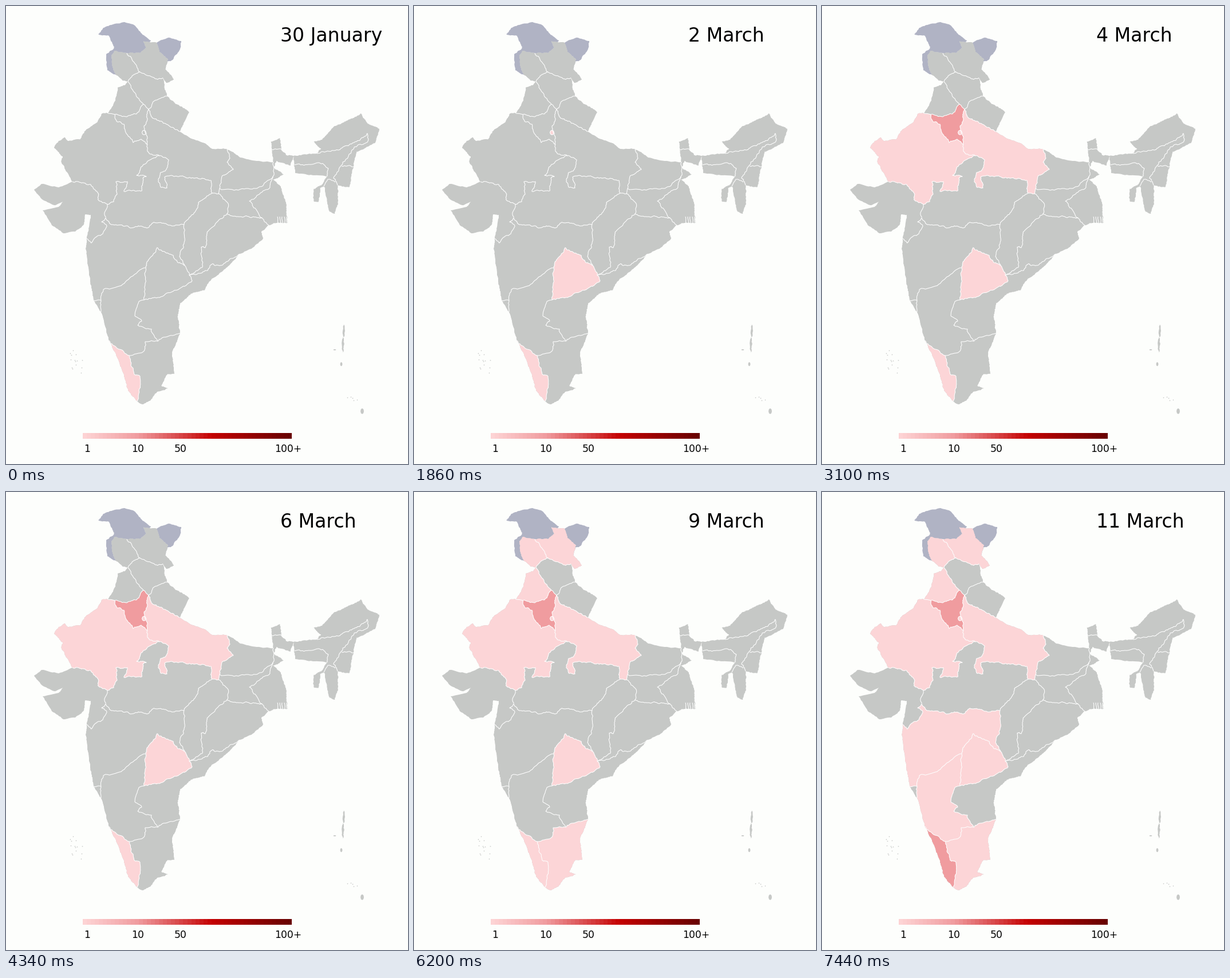
These frames come from a looping animation (702x798 px, 8000 ms). A matplotlib script:

```python
import numpy as np
import matplotlib.pyplot as plt
from matplotlib.animation import FuncAnimation
from matplotlib.collections import LineCollection, PolyCollection
from matplotlib.colors import LinearSegmentedColormap

W, H, DPI = 702, 798, 100
LOOP, TICK, STEP = 8000, 20, 620
PAPER, GREY, BLUE = "#fdfefc", "#c6c8c6", "#b0b3c4"
PALE, ROSE = "#fcd5d7", "#f09c9f"
rng = np.random.default_rng(4)


def px(size):
    return size * 72 / DPI


def arc(*xy, rough=1.5):
    """Fractal line through key points: halve the long segments, nudge the midpoints."""
    pts = np.reshape(xy, (-1, 2)).astype(float)
    while True:
        a, b = pts[:-1], pts[1:]
        size = np.hypot(*(b - a).T)[:, None]
        if size.max() < 4:
            return pts
        nudge = rng.uniform(-1, 1, size.shape) * np.minimum(0.2 * size, rough)
        mid = (a + b) / 2 + nudge * (b - a)[:, ::-1] * [1, -1] / size
        halves = np.stack([a, mid], 1).reshape(-1, 2)
        pts = np.vstack([halves, pts[-1:]])


def shore(*xy):
    return arc(*xy, rough=0.7)


def blob(x, y, w, h):
    turn = np.linspace(0, 2 * np.pi, 9)
    return shore(*np.ravel(np.c_[x + w / 2 * np.cos(turn), y + h / 2 * np.sin(turn)]))


def ring(*arcs):
    return np.vstack(arcs)


def rev(a):
    return a[::-1]


# Northern mountains
gil_out = shore(192, 120, 177, 112, 175, 84, 187, 76, 189, 71, 183, 60, 180, 52, 161, 49,
                170, 38, 184, 33, 207, 28, 225, 34, 237, 48, 253, 60, 250, 63)
gil_jk = shore(192, 120, 186, 105, 184, 86, 190, 78, 211, 82)
gil_lad = shore(211, 82, 234, 82, 245, 73, 240, 61, 250, 63)
lad_top = shore(250, 63, 263, 64)
aks_lad = shore(263, 64, 268, 80, 283, 93, 278, 110)
aks_out = shore(263, 64, 284, 55, 306, 61, 303, 77, 291, 94, 281, 97, 278, 110)
lad_se = shore(278, 110, 293, 128, 281, 134, 274, 125)
jk_lad = arc(211, 82, 225, 100, 234, 115)
lad_hp = arc(234, 115, 261, 127, 274, 125)
jk_w = shore(192, 120, 204, 130, 213, 132)
jk_hp = arc(213, 132, 224, 119, 234, 115)
hp_e = shore(274, 125, 277, 144, 281, 157)
uk_out = shore(281, 157, 300, 172, 320, 185, 303, 219)
hp_uk = arc(249, 180, 258, 166, 281, 157)
uk_up = arc(249, 180, 258, 196, 285, 209, 303, 219)

# Northern plains
pun_w = shore(213, 132, 208, 138, 195, 142, 191, 165, 178, 187)
pun_hp = arc(213, 132, 225, 151, 240, 171)
pun_har = arc(190, 189, 211, 193, 228, 188, 240, 171)
pun_raj = arc(178, 187, 190, 189)
har_raj = arc(190, 189, 193, 201, 206, 206, 209, 220, 222, 238, 236, 232, 247, 241)
har_up = arc(247, 241, 245, 222, 241, 209, 249, 180)
har_hp = arc(240, 171, 249, 180)
raj_w = shore(178, 187, 168, 187, 160, 202, 138, 218, 130, 232, 108, 235, 102, 229, 92, 235,
              84, 247, 99, 262, 97, 273, 116, 306)
raj_guj = arc(116, 306, 148, 311, 160, 325, 161, 338, 177, 346)
raj_mp = arc(177, 346, 188, 341, 194, 328, 192, 306, 212, 306, 206, 323, 237, 322, 239, 300,
             245, 297, 228, 295, 240, 276, 268, 261)
raj_up = arc(268, 261, 250, 257, 247, 241)
up_n = shore(303, 219, 326, 232, 350, 241, 360, 249, 386, 249)
up_bih = arc(386, 249, 391, 265, 386, 272, 397, 285, 386, 292, 377, 297, 373, 318)
up_s = arc(373, 318, 371, 327, 360, 326)
up_mp = arc(268, 261, 284, 268, 280, 285, 270, 290, 266, 303, 271, 316, 281, 317, 277, 298,
            310, 297, 337, 301, 358, 304, 360, 326)
delhi = blob(241, 220.5, 7, 8)

# East
bih_n = shore(386, 249, 395, 254, 409, 264, 438, 270, 467, 272)
wb_e = shore(467, 272, 464, 250, 463, 236, 478, 230, 481, 250, 490, 260, 502, 261, 497, 278,
             472, 270, 468, 282, 485, 294, 466, 302, 480, 315, 489, 344, 492, 378, 472, 378,
             459, 382)
odi_coast = shore(459, 382, 446, 393, 449, 405, 431, 421, 408, 432)
bih_wb = arc(467, 272, 466, 297)
bih_jha = arc(373, 318, 402, 320, 430, 319, 450, 311, 466, 297)
jha_wb = arc(466, 297, 461, 316, 425, 340, 447, 369)
jha_odi = arc(386, 362, 413, 368, 447, 369)
wb_odi = arc(447, 369, 459, 382)
chh_jha = arc(371, 327, 388, 344, 386, 362)
chh_odi = arc(386, 362, 351, 394, 348, 421, 341, 420, 343, 455, 320, 469)
mp_chh = arc(360, 326, 337, 341, 331, 357, 311, 381)
odi_ap = arc(320, 469, 352, 461, 361, 449, 374, 452, 408, 432)
sikkim = arc(464, 250, 481, 250)

# West and south
guj_coast = shore(141, 405, 145, 385, 148, 364, 138, 363, 135, 382, 121, 393, 100, 396,
                  80, 382, 64, 356, 92, 350, 99, 341, 84, 347, 62, 336, 49, 320, 62, 310,
                  92, 316, 116, 306)
guj_mp = arc(177, 346, 172, 360, 174, 370)
guj_mah = arc(141, 405, 149, 413, 154, 405, 165, 400, 176, 384, 167, 376, 174, 370)
mah_mp = arc(174, 370, 184, 381, 225, 385, 250, 385, 259, 377, 284, 382, 311, 381)
mah_chh = arc(311, 381, 311, 413, 303, 437, 312, 452)
mah_tel = arc(244, 456, 250, 441, 264, 421, 291, 434, 300, 447, 312, 452)
tel_chh = arc(312, 452, 320, 469)
tel_ap = arc(320, 469, 325, 479, 310, 488, 268, 508, 241, 512)
kar_tel = arc(244, 456, 243, 483, 241, 512)
mah_kar = arc(166, 513, 170, 494, 198, 488, 218, 472, 244, 456)
mah_coast = shore(153, 513, 147, 478, 140, 425, 141, 405)
goa_mah = arc(153, 513, 166, 513)
goa_kar = arc(166, 513, 166, 533)
goa_coast = shore(166, 533, 153, 513)
kar_coast = shore(180, 583, 174, 560, 166, 533)
kar_ap = arc(241, 512, 232, 515, 225, 540, 237, 549, 230, 556, 254, 563, 265, 584)
kar_tn = arc(265, 584, 243, 585, 240, 602, 215, 609)
tn_ap = arc(265, 584, 278, 577, 304, 570)
ker_kar = arc(180, 583, 195, 597, 215, 609)
ker_tn = arc(215, 609, 224, 642, 234, 645, 229, 689)
ker_coast = shore(229, 689, 213, 669, 205, 640, 192, 606, 180, 583)
ap_coast = shore(408, 432, 383, 458, 355, 480, 347, 495, 324, 501, 304, 518, 300, 540, 304, 570)
tn_coast = shore(304, 570, 290, 604, 294, 641, 282, 641, 271, 662, 283, 666, 264, 672,
                 253, 686, 238, 694, 229, 689)

# North-east
ne_north = shore(502, 261, 543, 257, 550, 248, 537, 236, 552, 233, 574, 209, 597, 199,
                 620, 187, 631, 204, 652, 214, 644, 239, 612, 254, 607, 280)
ne_south = shore(607, 280, 599, 316, 579, 312, 580, 345, 574, 362, 565, 358, 556, 315,
                 549, 317, 546, 341, 537, 340, 537, 319, 553, 310, 560, 297, 505, 291, 502, 261)
ne_borders = [
    arc(543, 257, 585, 248, 609, 237, 631, 222, 632, 236),
    arc(632, 236, 608, 246, 588, 272, 572, 300, 579, 312),
    arc(586, 279, 607, 280),
    arc(503, 277, 549, 274, 563, 283, 560, 297),
    arc(555, 314, 562, 302, 575, 307),
]

mainland = ring(gil_jk, gil_lad, lad_top, aks_lad, lad_se, hp_e, uk_out, up_n, bih_n, wb_e,
                odi_coast, ap_coast, tn_coast, ker_coast, kar_coast, goa_coast, mah_coast,
                guj_coast, rev(raj_w), rev(pun_w), rev(jk_w))
islands = [blob(590, 566, 4, 22), blob(588.5, 590, 4, 27), blob(585.5, 624, 4, 7),
           blob(622, 706, 6, 10), blob(574, 599, 5, 2)]
lakshadweep = rng.normal((121, 614), (11, 14), (14, 2))
nicobar = np.linspace((600, 679), (612, 687), 5) + rng.normal(0, 1.5, (5, 2))

# Each state: outline, step when it turns pale, step when it turns rose
NEVER = 99
states = [
    (ring(ker_kar, ker_tn, ker_coast), 0, 12),
    (ring(mah_tel, tel_chh, tel_ap, rev(kar_tel)), 3, NEVER),
    (ring(raj_w, raj_guj, raj_mp, raj_up, rev(har_raj), rev(pun_raj)), 4, NEVER),
    (ring(pun_har, har_hp, rev(har_up), rev(har_raj)), NEVER, 5),
    (ring(uk_up, up_n, up_bih, up_s, rev(up_mp), raj_up, har_up), 5, NEVER),
    (ring(gil_lad, lad_top, aks_lad, lad_se, rev(lad_hp), rev(jk_lad)), 8, NEVER),
    (ring(tn_ap, tn_coast, rev(ker_tn), rev(kar_tn)), 8, NEVER),
    (ring(gil_jk, jk_lad, rev(jk_hp), rev(jk_w)), 10, NEVER),
    (ring(pun_w, pun_raj, pun_har, rev(pun_hp)), 10, NEVER),
    (ring(mah_coast, guj_mah, mah_mp, mah_chh, rev(mah_tel), rev(mah_kar), rev(goa_mah)),
     11, NEVER),
    (ring(mah_kar, kar_tel, kar_ap, kar_tn, rev(ker_kar), kar_coast, rev(goa_kar)), 11, NEVER),
    (delhi, 3, NEVER),
]
borders = [jk_lad, lad_hp, jk_hp, hp_uk, uk_up, pun_hp, pun_har, pun_raj, har_raj, har_up,
           har_hp, delhi, raj_guj, raj_mp, raj_up, up_bih, up_s, up_mp, bih_wb, bih_jha,
           jha_wb, jha_odi, wb_odi, chh_jha, chh_odi, mp_chh, odi_ap, sikkim, guj_mp, guj_mah,
           mah_mp, mah_chh, mah_tel, tel_chh, tel_ap, kar_tel, mah_kar, goa_mah, goa_kar,
           kar_ap, kar_tn, tn_ap, ker_kar, ker_tn, *ne_borders]
borders += [shore(x, 367, x + 1, 380) for x in range(474, 491, 4)]  # delta channels

fig = plt.figure(figsize=(W / DPI, H / DPI), dpi=DPI, facecolor=PAPER)
ax = fig.add_axes([0, 0, 1, 1])

ramp = LinearSegmentedColormap.from_list("ramp", [
    (0, "#fdd3d4"), (0.26, "#f09c9f"), (0.46, "#d8484a"), (0.62, "#c40000"), (1, "#680000")])
ax.pcolormesh(np.linspace(134, 499, 53), [743.6, 754.4], np.linspace(0, 1, 52)[None], cmap=ramp)

ax.add_collection(PolyCollection([mainland, ring(ne_north, ne_south), *islands],
                                 facecolors=GREY, linewidths=0))
ax.add_collection(PolyCollection([ring(gil_out, rev(gil_lad), rev(gil_jk)),
                                  ring(aks_out, rev(aks_lad))], facecolors=BLUE, linewidths=0))
tints = ax.add_collection(PolyCollection([s[0] for s in states], linewidths=0))
ax.add_collection(LineCollection(borders, colors="white", linewidths=px(1.05)))
ax.scatter(*ring(lakshadweep, nicobar).T, s=px(1.6) ** 2, c=GREY, linewidths=0)

for x, label in ((142, "1"), (230.5, "10"), (305, "50"), (492.5, "100+")):
    ax.text(x, 777, label, ha="center", fontsize=px(17.2), family="DejaVu Sans")
date = ax.text(479, 62.3, "", fontsize=px(33.2), family="DejaVu Sans")
ax.set(xlim=(0, W), ylim=(H, 0))
ax.axis("off")

DATES = ["30 January", "2 February", "3 February"] + [f"{d} March" for d in range(2, 12)]


def draw(frame):
    step = frame * TICK // STEP
    date.set_text(DATES[step])
    tints.set_facecolor([ROSE if step >= rose else PALE if step >= pale else GREY
                         for _, pale, rose in states])
    return date, tints


anim = FuncAnimation(fig, draw, frames=LOOP // TICK, interval=TICK, repeat=True, repeat_delay=0)
plt.show()
```
